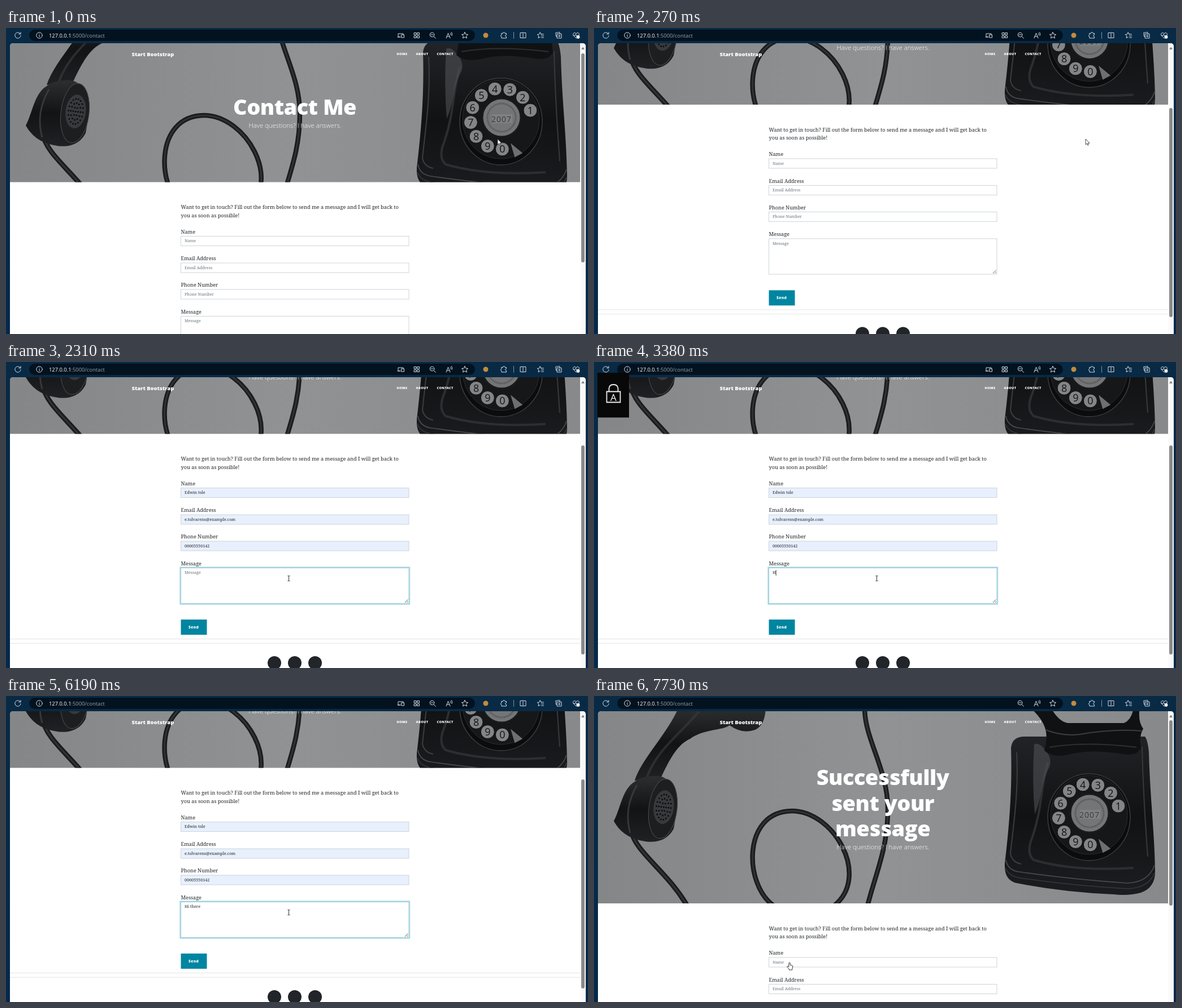
Write an HTML page that moves like this. It is 1030 px wide and 543 px high and loops after 8000 ms.

```html
<!DOCTYPE html>
<html lang="en">
<head>
<meta charset="utf-8">
<title>Contact form</title>
<style>
  html, body { margin: 0; width: 100%; height: 100%; overflow: hidden; background: #06294a; }
  svg { display: block; width: 100vw; height: 100vh; }
  text { white-space: pre; }
  .serif { font-family: "Noto Serif", serif; fill: #212529; }
  .sans { font-family: "Open Sans", sans-serif; fill: #fff; }
  .heavy { font-weight: 800; }
  .icon { fill: none; stroke: #d5dce2; stroke-width: 1; stroke-linecap: round; stroke-linejoin: round; }
</style>
</head>
<body>
<svg id="stage" viewBox="0 0 1030 543" preserveAspectRatio="none"></svg>
<script>
const LOOP = 8000, SCROLL_END = 146, SENT_SHIFT = 94.5;
const FIELDS = [
  { label: 'Name', y: 369.5, h: 17, value: 'Edwin tole' },
  { label: 'Email Address', y: 417, h: 17, value: 'e.tolvarens@example.com' },
  { label: 'Phone Number', y: 464, h: 17, value: '00005550142' },
  { label: 'Message', y: 511.5, h: 63, value: '' }
];
const TYPING = [[3380, 'H'], [3910, 'Hi'], [4260, 'Hi '], [4590, 'Hi t'], [4790, 'Hi th'],
  [5120, 'Hi the'], [5250, 'Hi ther'], [5380, 'Hi there']];

const text = (x, y, s, size, cls, extra = '') =>
  `<text x="${x}" y="${y}" font-size="${size}" class="${cls}" ${extra}>${s}</text>`;
const rect = (x, y, w, h, fill, extra = '') =>
  `<rect x="${x}" y="${y}" width="${w}" height="${h}" fill="${fill}" ${extra}/>`;
const circle = (x, y, r, fill, extra = '') =>
  `<circle cx="${x}" cy="${y}" r="${r}" fill="${fill}" ${extra}/>`;
const line = (d, stroke, width, extra = '') =>
  `<path d="${d}" fill="none" stroke="${stroke}" stroke-width="${width}" ${extra}/>`;
const shape = (d, fill, extra = '') => `<path d="${d}" fill="${fill}" ${extra}/>`;
const gradient = (id, stops, dir = 'x2="0" y2="1"') =>
  `<linearGradient id="${id}" ${dir}>` + stops.map(([o, c]) =>
    `<stop offset="${o}" stop-color="${c}"/>`).join('') + '</linearGradient>';

function mouthHoles() {
  let out = '';
  for (let ring = 0; ring < 4; ring++) {
    const n = ring ? ring * 6 : 1;
    for (let i = 0; i < n; i++) {
      const a = i / n * 2 * Math.PI;
      out += circle((123 + Math.cos(a) * ring * 4.3).toFixed(1),
        (197 + Math.sin(a) * ring * 7.5).toFixed(1), 1.5, '#0b0c0d');
    }
  }
  return out;
}

function dialHoles() {
  return [...'1234567890'].map((digit, i) => {
    const a = -(16 + i * 28.5) * Math.PI / 180;
    const x = 876 + 54 * Math.cos(a), y = 210 + 54 * Math.sin(a);
    return circle(x, y, 12, '#848587', 'stroke="#0c0d0e"') +
      text(x, y + 6.5, digit, 18, 'sans', 'text-anchor="middle" style="fill:#131416"');
  }).join('');
}

function photo() {
  const cord = (d, w) => line(d, '#1b1c1e', w) + line(d, '#333436', w * .3);
  return rect(7, -30, 1009, 420, 'url(#wall)') +
    cord('M479 20C478 75 520 130 520 200C520 270 500 310 484 372', 8.5) +
    cord('M318 372C265 335 262 205 350 204C425 204 490 320 425 372', 8.5) +
    cord('M65 236C72 278 128 308 166 374', 9) +
    // handset
    shape('M150 20C128 70 85 110 72 150L118 146C135 110 148 86 170 76C195 58 225 62 240 52Q262 68 285 60Q303 52 304 20Z', 'url(#handset)') +
    line('M186 27C150 70 112 95 94 143', '#3b3c3e', 4, 'opacity=".6"') +
    shape('M72 152C50 165 47 200 35 222C45 240 60 252 85 257C112 263 132 254 141 235L148 195C148 160 130 139 105 142Q85 142 72 152Z', 'url(#handset)') +
    line('M76 158Q52 200 64 243', '#434447', 3, 'opacity=".7"') +
    '<g transform="rotate(7 122 200)"><ellipse cx="122" cy="200" rx="25" ry="53" fill="#1d1e20" stroke="#4b4c4f"/>' +
    '<ellipse cx="123" cy="197" rx="18" ry="30" fill="#38393c"/>' + mouthHoles() + '</g>' +
    // telephone body
    shape('M738 92Q740 72 762 72L975 72Q980 78 982 100C984 180 992 240 993 312Q993 340 968 349Q945 355 920 352Q830 348 748 332Q722 326 728 288C736 220 740 160 738 92Z', 'url(#body)') +
    line('M729 291Q732 309 752 312Q850 326 945 332Q982 330 992 300', '#4a4b4e', 1.6) +
    line('M728 305Q734 320 755 323Q850 337 945 342Q982 340 992 314', '#36373a', 1.6) +
    line('M748 100C752 170 742 230 737 280Q740 295 756 298', '#3c3d40', 2) +
    line('M803 118C790 165 793 200 776 250Q764 278 778 291Q850 312 955 305', '#2d2e31', 4) +
    line('M970 90Q972 180 980 285', '#38393c', 2) +
    shape('M779 86Q786 82 795 92Q812 108 806 126C792 150 792 185 780 210Q775 150 779 86Z', '#55565a', 'opacity=".55"') +
    // cradle
    shape('M771 20L808 20Q822 45 838 48L938 48Q952 42 955 20L966 20Q962 45 972 58Q964 72 968 92Q962 107 935 103Q880 94 845 103Q812 111 797 97Q804 72 798 56Q792 38 771 20Z', '#101113') +
    line('M799 60Q830 72 860 68Q920 58 969 62', '#3c3d40', 2) +
    line('M806 91Q870 80 960 91', '#2f3033', 2) +
    // dial
    '<ellipse cx="876" cy="215" rx="73" ry="77" fill="#0b0c0e" stroke="#3b3c3f" stroke-width="1.5"/>' +
    '<ellipse cx="876" cy="211" rx="68" ry="70" fill="#161719" stroke="#2c2d30"/>' + dialHoles() +
    circle(877, 208, 34, '#747577', 'stroke="#191a1c" stroke-width="3"') +
    circle(877, 208, 25, 'none', 'stroke="#4d4e50" stroke-width="3" stroke-dasharray="1.5 1.5"') +
    rect(860, 202, 36, 16, '#7f8082') +
    text(877, 215.5, '2007', 14, 'sans', 'text-anchor="middle" style="fill:#38393b" letter-spacing="1"') +
    shape('M892 252L915 271L900 279Z', '#6e6f71', 'stroke="#111"');
}

function field({ label, y, h }, i) {
  const ring = rect(308.5, y - 1, 405.5, h + 2, 'none', `id="ring${i}" stroke="#add8e1" stroke-width="2.4"`);
  return text(309.5, y - 4.8, label, 9.1, 'serif') + ring +
    rect(309.5, y, 403.5, h, '#fff', `id="box${i}" stroke="#ced4da"`) +
    text(316, y + 10.8, label, 7.2, 'serif', `id="value${i}"`);
}

function toolbar() {
  const icon = (x, d, id = '') => `<g transform="translate(${x} 13)" class="icon" ${id}>${d}</g>`;
  const p = d => `<path d="${d}"/>`;
  const star = 'M0 -5.5L1.7 -1.9L5.6 -1.5L2.7 1.2L3.5 5.1L0 3.1L-3.5 5.1L-2.7 1.2L-5.6 -1.5L-1.7 -1.9Z';
  return rect(41, 3, 789, 20, '#03121f', 'rx="10"') +
    icon(21, p('M4.6 -2.4A5.2 5.2 0 1 0 5.2 .6M5 -5.4V-2.2H1.8'), 'id="reload"') +
    icon(21, p('M-4 -4L4 4M4 -4L-4 4'), 'id="stop"') +
    icon(59, '<circle r="5.2"/>' + p('M0 -.5V2.6M0 -2.6V-2.5')) +
    text(76, 16.6, '127.0.0.1<tspan fill="#9aa5ae">:5000/contact</tspan>', 9.35, 'sans') +
    '<g id="pageTools">' +
    icon(699, p('M-2 3H-5V-3H4V-1M-6 3H-1M1 -1H5.5V4H1Z')) +
    icon(727, p('M-4.5 -4.5H-1V-1H-4.5ZM1 -4.5H4.5V-1H1ZM-4.5 1H-1V4.5H-4.5ZM1 1H4.5V4.5H1Z')) + '</g>' +
    icon(755, '<circle cx="-1" cy="-1" r="3.8"/>' + p('M2 2L5.5 5.5M-2.8 -1H.8')) +
    icon(784, p('M-5 5L-1.5 -4L2 5M-3.8 2H.8M2.5 -4Q4 -2.5 3.2 -.5M4.5 -5.5Q6.8 -2.8 5.2 .5')) +
    icon(812, p(star)) +
    circle(849, 13, 4.5, '#c58a3c') +
    icon(881, p('M-4 -3.5H-1.5Q-1.5 -5.5 .3 -5.5T2 -3.5H4.5V-1Q2.6 -1 2.6 .6T4.5 2.3V5H-4V2.5Q-5.5 2.3 -5.5 .8T-4 -1Z')) +
    icon(898.5, p('M0 -5.5V5.5'), 'opacity=".6"') +
    icon(915, p('M-1.3 -4.5H-5V4.5H-1.3M1.3 -4.5H5V4.5H1.3M0 -5.5V5.5')) +
    icon(946, p('M2 -1.9H.9L-.8 -5.5L-2.3 -1.9L-5.8 -1.5L-3.2 1L-4 4.8L-.8 3.2M1.5 -2H5.5M1.5 1H5.5M1.5 4H5.5')) +
    icon(978, p('M-2.5 -2.5H5V5H-2.5ZM-2.5 2H-4.5L-5.2 -4.6L2 -5.4V-2.5M1.2 -.6V3M-.6 1.2H3')) +
    icon(1009, p('M0 5L-5 0Q-6.4 -3.6 -3.2 -4.5Q-1 -4.8 0 -2.6Q1 -4.8 3.2 -4.5Q6.4 -3.6 5 0ZM-5 .3H-2L-.6 -1.8L.9 2L2 .3H5')) +
    circle(1012.5, 16, 3, '#e8edf1');
}

function page() {
  const nav = [[691.5, 'HOME'], [725.5, 'ABOUT'], [762.5, 'CONTACT']];
  const title = (y, s) => text(511, y, s, 37.9, 'sans heavy', 'text-anchor="middle" letter-spacing="-.5"');
  return '<g clip-path="url(#pageClip)">' + rect(7, 27, 1019, 516, '#fff') +
    '<g id="scroll"><g clip-path="url(#heroClip)">' + `<g id="photo">${photo()}</g>` +
    `<g id="titleAsk">${title(154, 'Contact Me')}</g>` +
    `<g id="titleSent">${title(158, 'Successfully')}${title(203.5, 'sent your')}${title(249, 'message')}</g>` +
    text(511.5, 177, 'Have questions? I have answers.', 11.35, 'sans', 'id="sub" font-weight="300" text-anchor="middle"') +
    '</g><g id="form">' +
    text(309.5, 321.3, 'Want to get in touch? Fill out the form below to send me a message and I will get back to', 9.2, 'serif') +
    text(309.5, 335.5, 'you as soon as possible!', 9.2, 'serif') +
    FIELDS.map(field).join('') +
    line('M706 573L711.5 567.5M709.5 573L711.5 571', '#444', .9) +
    rect(0, 0, .8, 10, '#111', 'id="caret"') +
    line('M325.5 521.8H344.5', '#4a5a9a', .8, 'id="underline"') +
    rect(309.5, 603, 46, 27, '#0085a1', 'id="send"') +
    text(323, 618.8, 'Send', 6.6, 'sans heavy', 'letter-spacing=".4"') +
    line('M7 637.5H1016M7 645.3H1016', '#dcdee0', .8) +
    [475, 511, 547].map(x => circle(x, 680, 12, '#212529')).join('') + '</g></g>' +
    text(222.5, 49.6, 'Start Bootstrap', 9.4, 'sans heavy') +
    nav.map(([x, s]) => text(x, 48, s, 5.7, 'sans heavy', 'letter-spacing=".35"')).join('') +
    rect(1016, 27, 10, 516, '#fafafa') + shape('M1018 38L1021 33.5L1024 38Z', '#858585') +
    rect(1018, 45, 6, 371, '#8a8a8a', 'id="thumb" rx="3"') + '</g>';
}

const stage = document.getElementById('stage');
stage.innerHTML = '<defs>' +
  gradient('chrome', [[0, '#082a45'], [1, '#05294b']]) +
  gradient('wall', [[0, '#858688'], [.5, '#919294'], [1, '#88898b']], 'x2="1" y2="0"') +
  gradient('handset', [[0, '#2d2e30'], [.5, '#121315'], [1, '#202124']]) +
  gradient('body', [[0, '#222326'], [.5, '#111214'], [1, '#1c1d20']]) +
  '<clipPath id="pageClip"><path d="M7 543V33Q7 27 13 27H1020Q1026 27 1026 33V543Z"/></clipPath>' +
  '<clipPath id="heroClip"><rect id="hero" x="7" y="0" width="1009" height="273.5"/></clipPath></defs>' +
  rect(0, 0, 1030, 543, 'url(#chrome)') + toolbar() + page() +
  '<g id="lock">' + rect(6, 19, 56, 79.5, '#080808') +
  '<g id="locked">' + line('M22.5 52.5H46.5V71.5H22.5ZM26.5 52V47Q27 40 34.5 40T42.5 47V52', '#eee', 1.8) +
  text(34.5, 68.5, 'A', 17, 'sans', 'text-anchor="middle"') + '</g>' +
  '<g id="unlocked">' + line('M19 54.5H40V72H19ZM35.5 54V47Q36 40.5 43 40.5T50.3 47V50', '#eee', 1.8) +
  text(29.5, 69, 'A', 16, 'sans', 'text-anchor="middle"') + '</g></g>' +
  circle(0, 0, 8.3, '#f5f500', 'id="halo" opacity=".6"') +
  '<g id="cursor">' +
  shape('M0 0V10L2.3 7.9L3.8 11.2L5.3 10.5L3.9 7.3H7Z', '#fff', 'id="arrow" stroke="#222" stroke-width=".8"') +
  line('M-2 -4.5H-.4L0 -4L.4 -4.5H2M0 -4V4M-2 4.5H-.4L0 4L.4 4.5H2', '#333', 1, 'id="beam"') +
  shape('M-1.2 .8Q0 -.8 1.1 .8V4.4L4.5 5Q6 5.4 5.7 7L4.8 11.5V13H-.8V11.7L-4.2 7.8Q-4.4 6 -2.8 6.4L-1.2 7.8Z', '#fff', 'id="hand" stroke="#222" stroke-width=".9"') + '</g>';

const el = {};
stage.querySelectorAll('[id]').forEach(n => el[n.id] = n);
const set = (id, attrs) => { for (const k in attrs) el[id].setAttribute(k, attrs[k]); };
const show = (id, on) => { el[id].style.display = on ? '' : 'none'; };
const move = (id, x, y) => set(id, { transform: `translate(${x} ${y})` });
const within = (t, a, b) => t >= a && t < b;
const clamp = v => Math.max(0, Math.min(1, v));
const ease = v => v * v * (3 - 2 * v);

// [start, end, x, y]: moves to x, y between start and end
const PATH = [[0, 0, 870, 197], [330, 870, 588, 272], [870, 1140, 584.5, 228],
  [1550, 1550, 500.5, 384], [6330, 6860, 346, 473]];

function pointer(t) {
  const step = Math.floor(t / 66.7) * 66.7;
  let [, , x, y] = PATH[0];
  for (const [a, b, nx, ny] of PATH) {
    const k = a === b ? +(t >= a) : ease(clamp((step - a) / (b - a)));
    x += (nx - x) * k;
    y += (ny - y) * k;
  }
  return [x, y];
}

function scrolled(t) {
  const u = clamp((Math.floor(t / 66.7) * 66.7 + 35) / 356);
  return Math.max(0, (SCROLL_END + 3.5) * (1 - Math.cos(Math.PI * u)) / 2 - 3.5);
}

function render(t) {
  const sent = t >= 7400, loading = within(t, 7000, 7660);
  const s = sent || t < 66 ? 0 : scrolled(t);
  move('scroll', 0, -s);
  move('photo', 0, sent ? 0 : -49);
  move('form', 0, sent ? SENT_SHIFT : 0);
  move('sub', 0, sent ? SENT_SHIFT : 0);
  set('hero', { height: sent ? 368 : 273.5 });
  set('thumb', { y: sent ? 43 : 45 + s * .705, height: sent ? 329 : 371 });
  show('titleAsk', !sent);
  show('titleSent', sent);
  show('stop', loading);
  show('reload', !loading);
  show('pageTools', t < 7000);

  const filled = within(t, 1550, 7400);
  const typed = sent ? '' : TYPING.reduce((last, [at, str]) => t >= at ? str : last, '');
  FIELDS.forEach(({ label, value }, i) => {
    const content = i === 3 ? typed : filled ? value : '';
    const node = el['value' + i];
    const blank = i === 3 && within(t, 3110, 3380) ? label : content || label;
    if (node.textContent !== blank) node.textContent = blank;
    node.style.fill = content ? '#212529' : '#6c757d';
    set('box' + i, { fill: content && i < 3 ? '#e8f0fe' : '#fff' });
  });

  const onName = within(t, 1480, 1750), onMessage = within(t, 1750, 6860);
  for (let i = 0; i < 4; i++) show('ring' + i, false);
  show('ring0', onName && t >= 1550);
  show('ring3', onMessage);
  set('ring3', { opacity: t < 1820 ? .5 : 1 });
  set('box3', { stroke: onMessage ? '#9fcfdb' : '#ced4da' });
  show('caret', within(t, 1480, 1550) || within(t, 1750, 2310) ||
    within(t, 2840, 5930) || within(t, 6460, 6860));
  const width = typed ? el.value3.getComputedTextLength() : 0;
  set('caret', { x: 316 + width, y: onName ? 372.5 : 515 });
  show('underline', within(t, 6860, 7400));
  if (typed === 'Hi there') {
    const from = 316 + el.value3.getSubStringLength(0, 3);
    set('underline', { d: `M${from} 521.8H${316 + width}` });
  }

  show('lock', within(t, 3110, 6190));
  set('lock', { opacity: t < 3180 ? .5 : 1 });
  const open = t < 3640 ? 0 : t < 3710 ? .5 : 1;
  set('locked', { opacity: 1 - open });
  set('unlocked', { opacity: open });

  const [x, y] = pointer(t);
  const overSend = !sent && within(x, 309, 356) && within(y, 457, 484);
  const overField = !sent && within(x, 309, 713) &&
    FIELDS.some(f => within(y, f.y - s, f.y + f.h - s));
  const kind = t >= 7730 || overSend && t < 7000 ? 'hand' : overField ? 'beam' : 'arrow';
  for (const id of ['hand', 'beam', 'arrow']) show(id, id === kind);
  move('cursor', x, y);
  set('send', { fill: overSend ? '#006f86' : '#0085a1' });
  show('halo', within(t, 1480, 1550) || within(t, 1750, 1900) || within(t, 6860, 6930));
  move('halo', x - .5, y);
}

const start = performance.now();
function tick() {
  render((performance.now() - start) % LOOP);
  requestAnimationFrame(tick);
}
tick();
</script>
</body>
</html>
```
